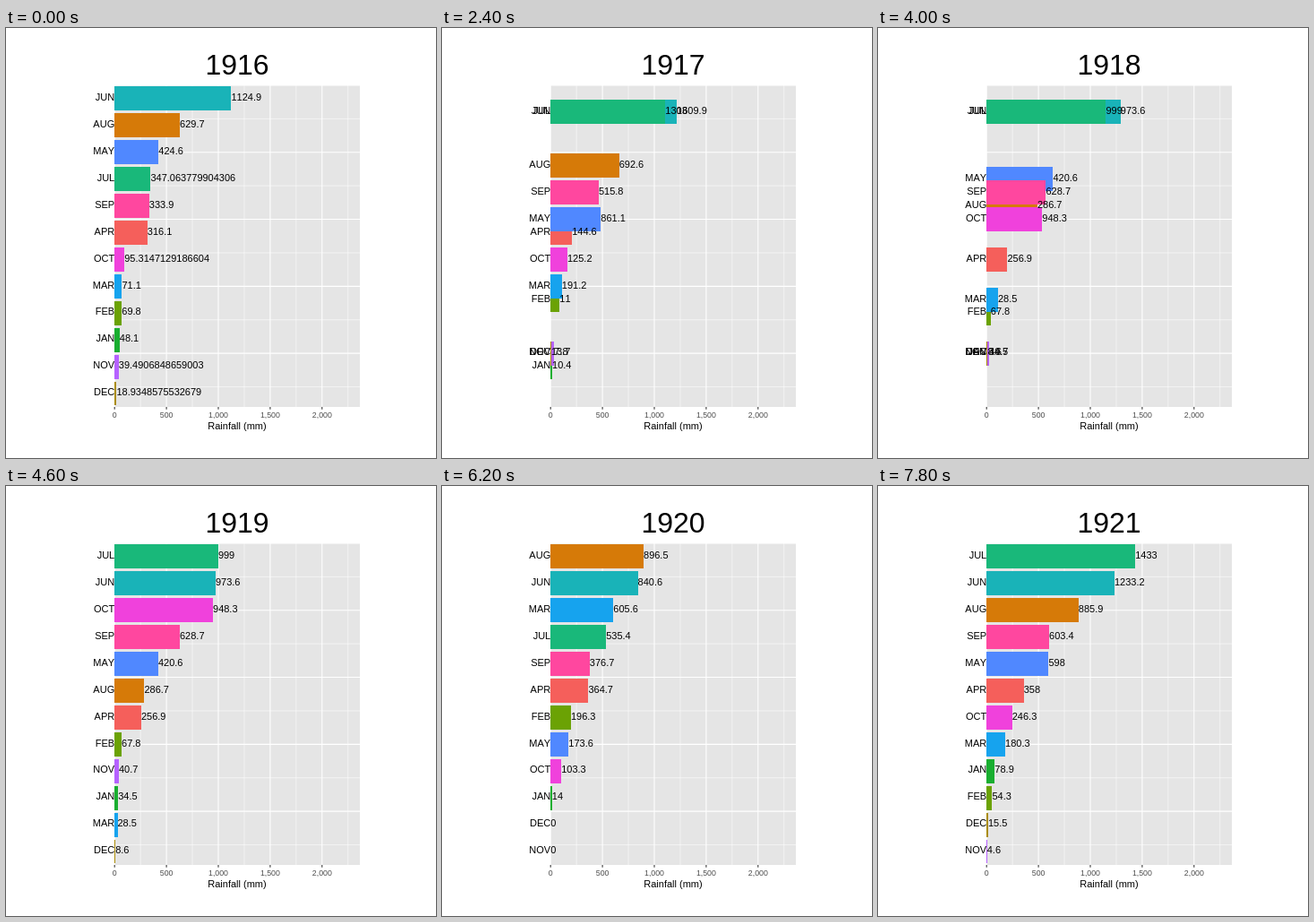
These frames come from a looping animation (480 by 480 pixels, 8000 ms). An HTML page with a canvas:

```html
<!DOCTYPE html>
<html lang="en">
<head>
<meta charset="utf-8">
<title>Monthly rainfall</title>
<style>
  html, body { margin: 0; width: 100%; height: 100%; overflow: hidden; background: #fff; }
  canvas { display: block; width: 480px; height: 480px; }
</style>
</head>
<body>
<canvas id="chart" width="480" height="480"></canvas>
<script>
const ctx = document.getElementById('chart').getContext('2d');

// Rainfall in mm, one reading per year; later months are painted on top
const FIRST_YEAR = 1916, YEARS = 6;
const MONTHS = [
  { name: 'JAN', color: '#19ae30', rain: [48.1, 21.4, 10.4, 34.5, 14, 78.9] },
  { name: 'FEB', color: '#6ba204', rain: [69.8, 164.5, 11, 67.8, 196.3, 54.3] },
  { name: 'MAR', color: '#16a3ee', rain: [71.1, 27.3955034680698, 191.2, 28.5, 605.6, 180.3] },
  { name: 'APR', color: '#f55f5b', rain: [316.1, 269.6, 144.6, 256.9, 364.7, 358] },
  { name: 'MAY', color: '#5088ff', rain: [424.6, 107.9, 861.1, 420.6, 173.6, 598] },
  { name: 'JUN', color: '#19b3b8', rain: [1124.9, 823.8, 1609.9, 973.6, 840.6, 1233.2] },
  { name: 'JUL', color: '#19b87a', rain: [347.063779904306, 909.1, 1303, 999, 535.4, 1433] },
  { name: 'AUG', color: '#d67a08', rain: [629.7, 628.4, 692.6, 286.7, 896.5, 885.9] },
  { name: 'SEP', color: '#ff479f', rain: [333.9, 411.5, 515.8, 628.7, 376.7, 603.4] },
  { name: 'OCT', color: '#f041dc', rain: [95.3147129186604, 199.3, 125.2, 948.3, 103.3, 246.3] },
  { name: 'NOV', color: '#b562ff', rain: [39.4906848659003, 63.5, 7.8, 40.7, 0, 4.6] },
  { name: 'DEC', color: '#aa8c07', rain: [18.9348575532679, 0, 13.7, 8.6, 0, 15.5] }
];

const STEP = 200, MOVE_STEPS = 6, YEAR_STEPS = 8, FIRST_MOVE = 2;
const LOOP = YEAR_STEPS * (YEARS - 1) * STEP;
const LEFT = 121.2, RIGHT = 395, TOP = 63.95, ROW = 29.92;
const BOTTOM = TOP + MONTHS.length * ROW;
const MID = 258, BAR = ROW * 0.9;
const FONT = '"Liberation Sans", Arial, sans-serif';

const valueX = value => LEFT + value * 0.1158;
const rankY = rank => TOP + (rank - 0.5) * ROW;
const mix = (a, b, p) => a + (b - a) * p;

// A month's rank is one more than the number of months ahead of it; ties go by name
function rankOf(month, year) {
  const ahead = m => m.rain[year] > month.rain[year] ||
    (m.rain[year] === month.rain[year] && m.name < month.name);
  return 1 + MONTHS.filter(ahead).length;
}

function text(str, x, y, size, align, color = '#000') {
  ctx.font = `${size}px ${FONT}`;
  ctx.fontKerning = 'none';
  ctx.textAlign = align;
  ctx.fillStyle = color;
  ctx.fillText(str, x, y);
}

// Rectangle with its edges on whole pixels
function crispRect(x1, y1, x2, y2, color) {
  const [l, t, r, b] = [x1, y1, x2, y2].map(Math.round);
  ctx.fillStyle = color;
  ctx.fillRect(l, t, r - l, b - t);
}

function line(x1, y1, x2, y2, width, color) {
  ctx.lineWidth = width;
  ctx.strokeStyle = color;
  ctx.beginPath();
  ctx.moveTo(x1, y1);
  ctx.lineTo(x2, y2);
  ctx.stroke();
}

function drawPanel() {
  ctx.save();
  ctx.beginPath();
  ctx.rect(121, 64, RIGHT - 121, 359);
  ctx.clip();
  crispRect(LEFT, TOP, RIGHT, BOTTOM, '#e5e5e5');
  // Minor lines first, then major ones
  for (const [first, width] of [[1, 0.53], [0, 1.07]]) {
    for (let i = first; i < 10; i += 2) {
      const x = valueX(i * 250);
      const y = TOP + i * 1.25 * ROW;
      line(LEFT, y, RIGHT, y, width, '#fff');
      line(x, TOP, x, BOTTOM, width, '#fff');
    }
  }
  ctx.restore();
}

function drawAxis() {
  for (let v = 0; v <= 2000; v += 500) {
    const x = valueX(v);
    line(x, BOTTOM, x, BOTTOM + 2.75, 1.07, '#333');
    text(v.toLocaleString('en-US'), x, 435, 8.8, 'center', '#4d4d4d');
  }
  text('Rainfall (mm)', MID, 448, 11, 'center');
}

function draw(time) {
  // Each year moves for six steps, then rests for two
  const step = Math.floor(time / STEP) - FIRST_MOVE;
  const from = Math.max(0, Math.floor(step / YEAR_STEPS));
  const to = Math.min(from + 1, YEARS - 1);
  const moved = Math.max(0, step - from * YEAR_STEPS + 1);
  const p = Math.min(1, moved / MOVE_STEPS);

  const rows = MONTHS.map(m => ({
    ...m,
    x: valueX(mix(m.rain[from], m.rain[to], p)),
    y: rankY(mix(rankOf(m, from), rankOf(m, to), p)),
    label: String(m.rain[p < 0.5 ? from : to])
  }));

  ctx.fillStyle = '#fff';
  ctx.fillRect(0, 0, 480, 480);
  drawPanel();
  for (const r of rows) crispRect(LEFT, r.y - BAR / 2, r.x, r.y + BAR / 2, r.color);
  for (const r of rows) {
    text(r.name, LEFT, r.y + 2.2, 11, 'right');
    text(r.label, r.x, r.y + 2.2, 11, 'left');
  }
  drawAxis();
  text(String(FIRST_YEAR + (p > 0.5 ? to : from)), MID, 52, 32, 'center');
}

const start = performance.now();
function tick() {
  draw((performance.now() - start) % LOOP);
  requestAnimationFrame(tick);
}
tick();
</script>
</body>
</html>
```
